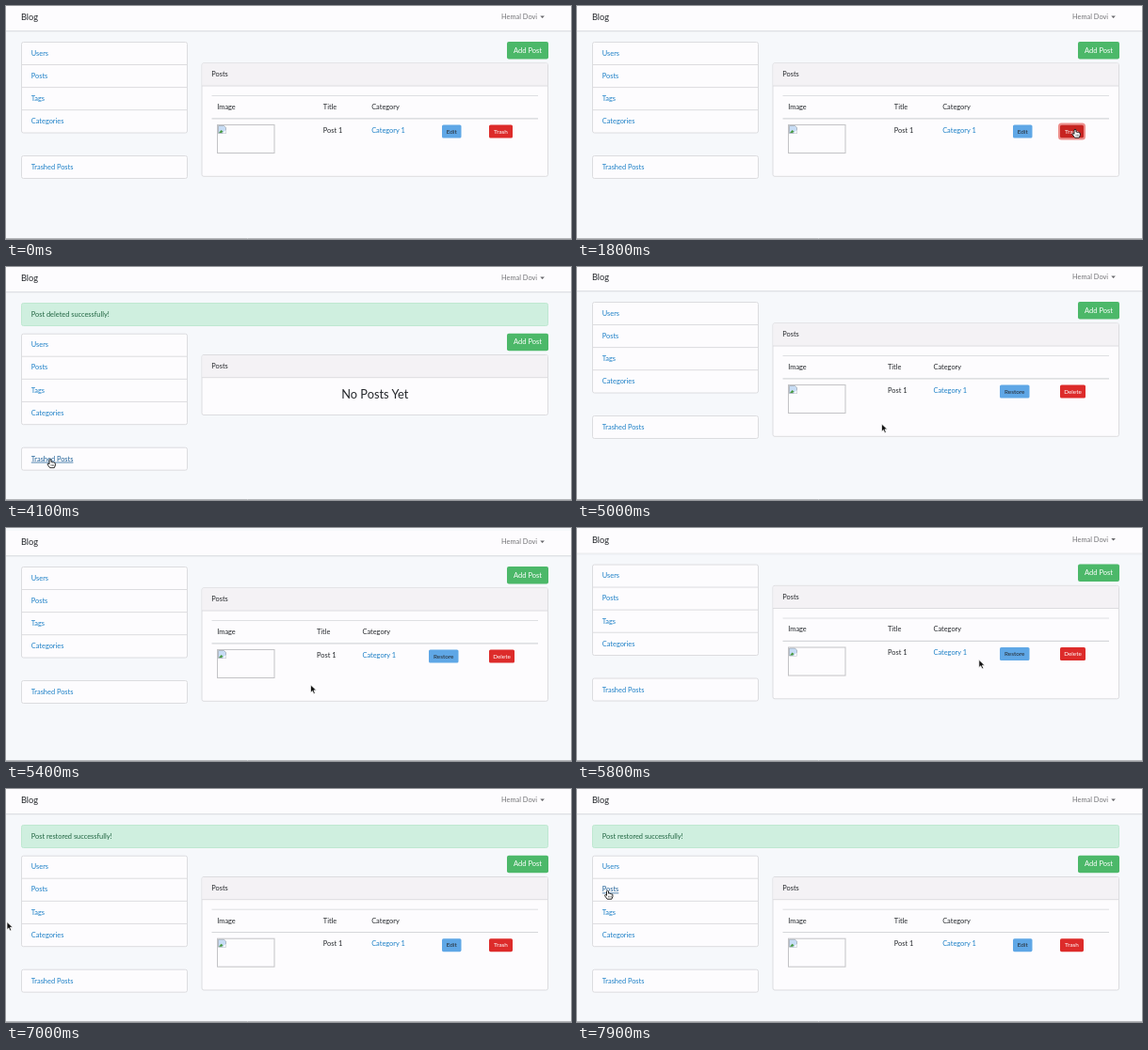
Animation, 600 px wide and 248 px high, one loop 8 s. Source, as an HTML page:

```html
<!DOCTYPE html>
<html lang="en">
<head>
<meta charset="utf-8">
<title>Blog admin</title>
<style>
html, body { margin: 0; width: 100%; height: 100%; overflow: hidden; background: #f6f8fb; }
svg { display: block; width: 600px; height: 248px; font-family: Nunito, Lato, sans-serif; }
</style>
</head>
<body>
<svg id="stage" viewBox="0 0 600 248"></svg>
<script>
const LOOP = 8000, STEP = 100;
const INK = '#24272b', LINK = '#1b7fc6', LINK_HOVER = '#1d5f96', PAPER = '#fdfcfe', EDGE = '#dcdcdf';

// Pointer tip: time, x, y
const POINTER = [
  [1000, 430, 165], [1500, 529, 131], [2700, 529, 131], [3600, 47, 204.5], [4500, 47, 204.5],
  [4900, 323.5, 167], [5500, 323.5, 167], [5950, 463, 131], [6250, 463, 131],
  [6600, 1, 141.5], [7100, 1, 141.5], [7600, 32.5, 108]
];
// Elastic overscroll: time, offset
const SCROLL = [[4850, 0], [5000, -1], [5150, -1], [5400, 3], [5600, 2], [5900, 0]];

const within = (t, a, b) => t >= a && t < b;

function track(keys, t) {
  const i = keys.findIndex(k => k[0] > t);
  if (i < 0) return keys[keys.length - 1].slice(1);
  if (i === 0) return keys[0].slice(1);
  const a = keys[i - 1], b = keys[i];
  const p = (t - a[0]) / (b[0] - a[0]), e = p * p * (3 - 2 * p);
  return a.slice(1).map((v, n) => v + (b[n + 1] - v) * e);
}

const rect = (x, y, w, h, fill, stroke = 'none', rx = 0, extra = '') =>
  `<rect x="${x}" y="${y}" width="${w}" height="${h}" rx="${rx}" fill="${fill}" stroke="${stroke}" ${extra}/>`;
const text = (x, y, str, size = 7.4, fill = INK, extra = '') =>
  `<text x="${x}" y="${y}" font-size="${size}" fill="${fill}" ${extra}>${str}</text>`;
const line = (x1, x2, y, color = EDGE, w = 1) =>
  `<path d="M${x1} ${y}H${x2}" stroke="${color}" stroke-width="${w}"/>`;
const group = (x, y, body) => `<g transform="translate(${x} ${y})">${body}</g>`;
const link = (x, y, str, hover) =>
  text(x, y, str, 7.4, hover ? LINK_HOVER : LINK, hover ? 'text-decoration="underline"' : '');

function button(x, w, label, fill, color, ring) {
  return (ring ? rect(x - 1, 125.5, w + 2, 16, 'none', ring, 2.5, 'stroke-width="2"') : '') +
    rect(x, 126.5, w, 14, fill, 'none', 1.6) +
    text(x + w / 2, 135.8, label, 6.4, color, 'text-anchor="middle"');
}

function navbar() {
  return rect(0, 26, 600, 1, '#dfe1e5') + rect(0, 27, 600, 1, '#eef0f3') +
    rect(0, 0, 600, 26, PAPER) + text(16, 15, 'Blog', 9.2) +
    text(526, 14.2, 'Hemal Dovi', 7.4, '#737376') +
    '<path d="M567.3 10.4h4.6l-2.3 2.5z" fill="#66666a"/>';
}

function sidebar(hover) {
  const names = ['Users', 'Posts', 'Tags', 'Categories'];
  return rect(16.5, 38.5, 176, 96.5, PAPER, EDGE, 2) +
    names.map((n, i) => (i ? line(16.5, 192.5, 38.4 + 24.1 * i) : '') +
      link(26.8, 52.6 + 24.2 * i, n, hover === n)).join('') +
    rect(16.5, 159.5, 176, 24, PAPER, EDGE, 2) +
    link(26.8, 174, 'Trashed Posts', hover === 'Trashed Posts');
}

const brokenImage = rect(224.5, 126.5, 60.5, 30, PAPER, '#c3c3c6') +
  '<path d="M225.5 127.5h6l2 2v6h-8z" fill="#c7dcf4" stroke="#8f979f" stroke-width=".6"/>' +
  '<path d="M226 135l2.5-3 2 1.5-1.5 1.5z" fill="#4b9b45"/>' +
  '<path d="M230 135.5l3.5-3.5v3.5z" fill="#fff"/>';

function table(trashed, t) {
  const [title, category] = trashed ? [330, 378.5] : [336.8, 388.2];
  const active = trashed ? t >= 5900 : within(t, 1500, 2300);
  const actions = trashed
    ? button(449, 31.5, 'Restore', active ? '#3f94dd' : '#5fa7e6', active ? '#fff' : INK,
        t >= 6100 && '#a5cdf0') +
      button(513, 27, 'Delete', '#dd2b2a', '#fff')
    : button(463, 20.5, 'Edit', '#5fa7e6', INK) +
      button(513, 25, 'Trash', active ? '#c72421' : '#dd2b2a', '#fff',
        within(t, 1700, 2300) && '#ee8f8c');
  return line(218.5, 565, 95.5, '#dedfe2') + line(218.5, 565, 119.8, '#d5d7da', 1.2) +
    text(224.3, 109.9, 'Image') + text(title, 109.9, 'Title') + text(category, 109.9, 'Category') +
    brokenImage + text(title, 134.6, 'Post 1') + link(category, 134.6, 'Category 1') + actions;
}

function content(view, t) {
  const empty = view === 'empty';
  return rect(532, 38, 44, 18.5, '#4cb869', 'none', 2) +
    text(554, 49.8, 'Add Post', 7.5, '#fff', 'text-anchor="middle"') +
    rect(208, 60.8, 367.5, empty ? 64 : 120.5, PAPER, EDGE, 2) +
    rect(208.5, 61.3, 366.5, 23.5, '#f4f2f5') + line(208, 575.5, 85) +
    text(218.3, 75.4, 'Posts') +
    (empty ? text(391.8, 107.2, 'No Posts Yet', 12.8, INK, 'text-anchor="middle"')
           : table(view === 'trashed', t));
}

const alertBox = msg => rect(16.5, 38.5, 559, 24, '#cfefdf', '#bfe8d1', 2) +
  text(26.8, 52.6, msg, 7.4, '#1f6440');

const ARROW = '<path d="M0 0v8.2l1.9-1.8 1.4 3.1 1.5-.7-1.4-3h2.7z" fill="#111" stroke="#fff" stroke-width=".7"/>';
const HAND = '<path d="M-1 .8Q0-.6 1 .8V3.2Q2 2.6 2.6 3.5 3.6 3 4.1 3.9 5.4 3.5 5.4 4.8V6.6L4.3 9.2H-.4L-3 5.6Q-3 4.2-1.6 4.8L-1 5.4Z" fill="#fff" stroke="#111" stroke-width=".9"/>' +
  '<path d="M1 5.7v1.8M2.4 5.7v1.8M3.8 5.7v1.8" stroke="#111" stroke-width=".5"/>';

function draw(t) {
  const view = within(t, 2300, 4600) ? 'empty' : within(t, 4600, 6900) ? 'trashed' : 'posts';
  const message = view === 'empty' ? 'Post deleted successfully!'
    : t >= 6900 ? 'Post restored successfully!' : '';
  const hover = within(t, 3600, 4600) ? 'Trashed Posts' : t >= 7500 ? 'Posts' : '';
  const onButton = within(t, 1500, 2300) || within(t, 5900, 6300);
  const [x, y] = track(POINTER, t);
  const [scroll] = track(SCROLL, t);
  const page = navbar() + (message && alertBox(message)) +
    group(0, message ? 32.7 : 0, sidebar(hover) + content(view, t));
  return rect(0, 0, 600, 248, '#f6f8fb') + group(0, scroll, page) +
    line(0, 600, 247.5, '#b4b6b9') +
    (t >= 1000 ? group(x, y, hover || onButton ? HAND : ARROW) : '');
}

const stage = document.getElementById('stage');
const start = performance.now();
let shown = -1;

function frame() {
  const t = Math.floor((performance.now() - start) % LOOP / STEP) * STEP;
  if (t !== shown) stage.innerHTML = draw(shown = t);
  requestAnimationFrame(frame);
}
frame();
</script>
</body>
</html>
```
